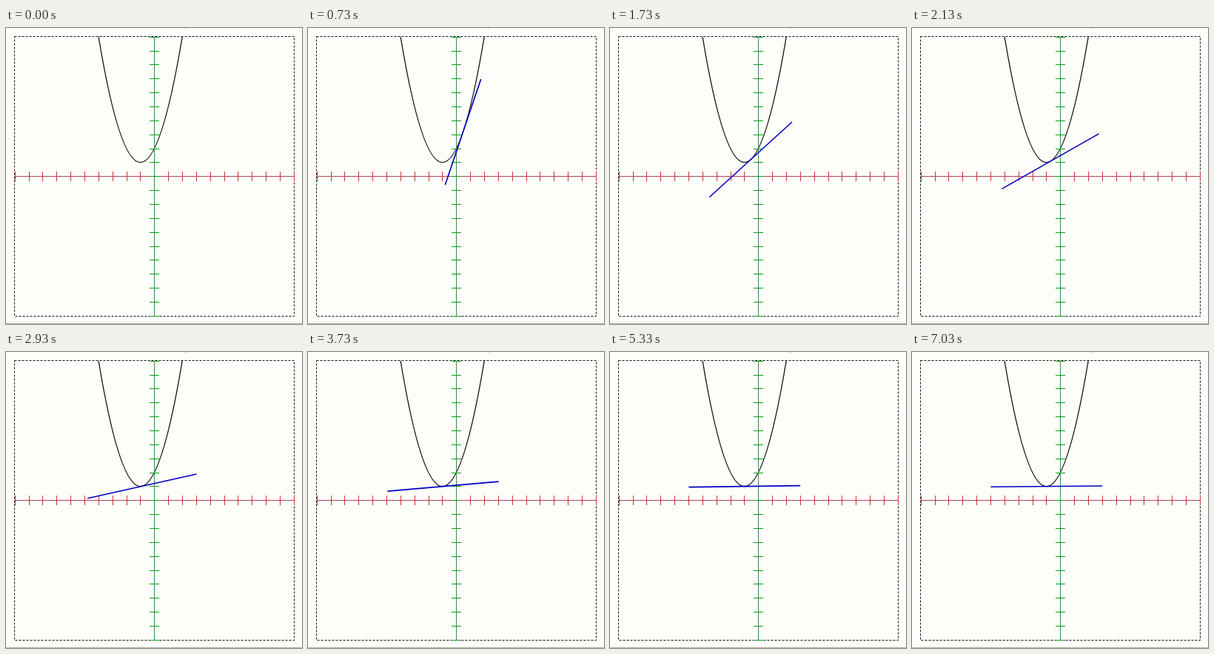
Write an HTML page that moves like this. It is 400 px wide and 400 px high and loops after 7.06 s.

```html
<!DOCTYPE html>
<html lang="en">
<head>
<meta charset="utf-8">
<title>Tangent descent</title>
<style>
  html, body { margin: 0; width: 100%; height: 100%; overflow: hidden; background: #fdfdfa; }
  svg { display: block; width: 400px; height: 400px; }
  path, line, rect { fill: none; }
  .crisp { shape-rendering: crispEdges; }
</style>
</head>
<body>
<svg viewBox="0 0 400 400">
  <defs><clipPath id="box"><rect x="11" y="11" width="379" height="379"/></clipPath></defs>
  <path d="M0 399.5H400" stroke="#b0b0a0"/>
  <path d="M241 .5h6" stroke="#e4e4c4"/>
  <rect x="11.5" y="11.5" width="378" height="378" stroke="#111122" stroke-dasharray="3 2"/>
  <path id="curve" stroke="#101010" stroke-width="1.3"/>
  <g class="crisp">
    <path d="M12 200.5H389" stroke="#a84858"/>
    <path id="xTicks" stroke="#cc3333"/>
    <path d="M200.5 12V389" stroke="#3c8a4c"/>
    <path id="yTicks" stroke="#109a18"/>
  </g>
  <g clip-path="url(#box)"><line id="tangent" stroke="#0000c0" stroke-width="1.6"/></g>
</svg>
<script>
  const UNIT = 18.85, MID = 200.5, TICK = 6.5, HALF = 4;
  const LOOP = 7060, LAST_STEP = 170, START = 3.5, DECAY = 1.04;
  const get = id => document.getElementById(id);
  const px = x => MID + x * UNIT;
  const py = y => MID - y * UNIT;

  // y = (x + 1)^2 + 1 between x = -4 and x = 2
  get('curve').setAttribute('d',
    `M${px(-4)} ${py(10)}Q${px(-1)} ${py(-8)} ${px(2)} ${py(10)}`);

  let xTicks = '', yTicks = '';
  for (let i = -10; i <= 10; i++) {
    const p = Math.round(px(i) - 0.2) + 0.5;
    xTicks += `M${p} ${MID - TICK}v${2 * TICK}`;
    yTicks += `M${MID - TICK} ${p}h${2 * TICK}`;
  }
  get('xTicks').setAttribute('d', xTicks);
  get('yTicks').setAttribute('d', yTicks);

  const tangent = get('tangent');

  function draw(now) {
    const step = Math.floor((now % LOOP + 3.4) * 0.03);
    // the distance to the minimum shrinks by a fixed ratio each step
    const d = START * DECAY ** -Math.min(step, LAST_STEP);
    const angle = Math.atan(2 * d);
    const dx = HALF * Math.cos(angle), dy = HALF * Math.sin(angle);
    const x = d - 1, y = d * d + 1;
    const ends = { x1: px(x - dx), y1: py(y - dy), x2: px(x + dx), y2: py(y + dy) };
    for (const key in ends) tangent.setAttribute(key, ends[key]);
    tangent.style.visibility = step > 0 ? 'visible' : 'hidden';
  }

  let start;
  function tick(now) {
    start ??= now;
    draw(now - start);
    requestAnimationFrame(tick);
  }
  draw(0);
  requestAnimationFrame(tick);
</script>
</body>
</html>
```
